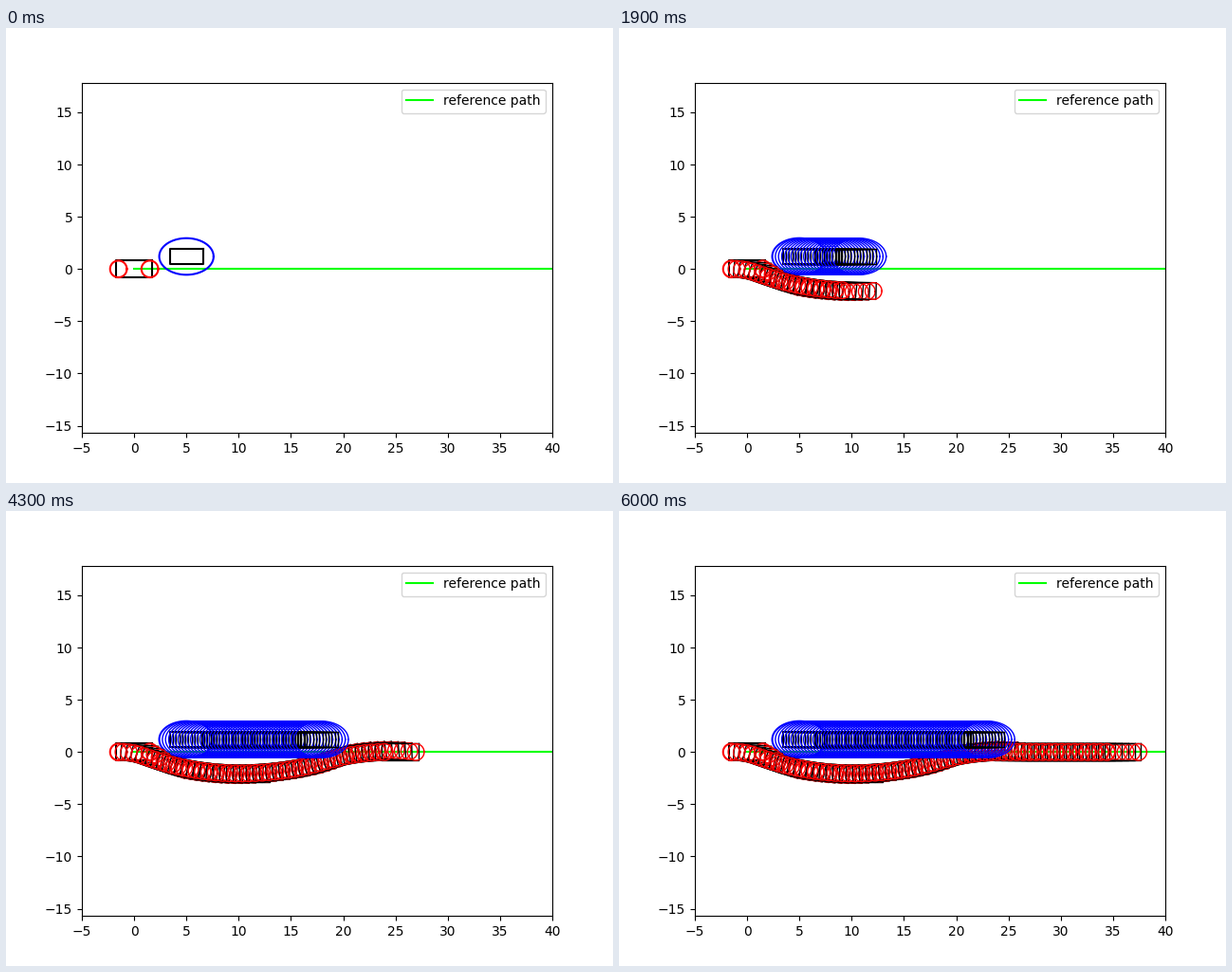
A matplotlib script that plays this animation: 640 by 480 pixels, repeating every 6.1 s.

```python
import numpy as np
import matplotlib.pyplot as plt
from matplotlib.animation import FuncAnimation

STEPS = 61
INTERVAL = 100

CAR_HALF = (1.75, 0.8)
AXLE, CIRCLE_R = 1.5, 0.8

OBST_START, OBST_STEP = (5.0, 1.2), 0.3
OBST_HALF = (1.6, 0.7)
SAFE_HALF = (2.6, 1.75)

# the car swerves right, passes, steers back and straightens: (step, heading)
SWERVE = [(0, 0), (4, -.33), (7, -.315), (20, 0), (28, .16), (33, .3), (43, 0)]
# it speeds up, then cruises: (step, distance per step)
PACE = [(0, .49), (16, .635), (60, .612)]


def along(keys):
    return np.interp(np.arange(STEPS), *zip(*keys))


def travel(start, delta):
    return start + np.concatenate([[0], np.cumsum(delta)[:-1]])


def box(cx, cy, half, yaw=0.0):
    px = np.array([1, -1, -1, 1, 1]) * half[0]
    py = np.array([1, 1, -1, -1, 1]) * half[1]
    c, s = np.cos(yaw), np.sin(yaw)
    return cx + c * px - s * py, cy + s * px + c * py


def oval(cx, cy, a, b):
    t = np.linspace(0, 2 * np.pi, 80)
    return cx + a * np.cos(t), cy + b * np.sin(t)


# the rear axle rolls along the heading
yaw, pace = along(SWERVE), along(PACE)
rear_x = travel(-AXLE, pace * np.cos(yaw))
rear_y = travel(0, pace * np.sin(yaw))

fig, ax = plt.subplots(figsize=(6.4, 4.8), dpi=100)
ax.plot([0, 50], [0, 0], color="lime", label="reference path")
ax.set_xlim(-5, 40)
mid_y, half_y = 1.075, 16.766
ax.set_ylim(mid_y - half_y, mid_y + half_y)
ax.legend(loc="upper right")


def stamp(k):
    """Outlines of car and obstacle left behind at step k."""
    width = 1 if k else 1.5  # the starting pose is drawn heavier

    def outline(points, color):
        line, = ax.plot(*points, color=color, lw=width, visible=False)
        return line

    x, y = rear_x[k], rear_y[k]
    dx, dy = AXLE * np.cos(yaw[k]), AXLE * np.sin(yaw[k])
    ox, oy = OBST_START[0] + OBST_STEP * k, OBST_START[1]
    return [
        outline(box(x + dx, y + dy, CAR_HALF, yaw[k]), "black"),
        outline(oval(x, y, CIRCLE_R, CIRCLE_R), "red"),
        outline(oval(x + 2 * dx, y + 2 * dy, CIRCLE_R, CIRCLE_R), "red"),
        outline(box(ox, oy, OBST_HALF), "black"),
        outline(oval(ox, oy, *SAFE_HALF), "blue"),
    ]


trail = [stamp(k) for k in range(STEPS)]


def update(frame):
    for k, parts in enumerate(trail):
        for part in parts:
            part.set_visible(k <= frame)
    return []


anim = FuncAnimation(fig, update, frames=STEPS, interval=INTERVAL,
                     init_func=lambda: update(0), repeat=True)
plt.show()
```
